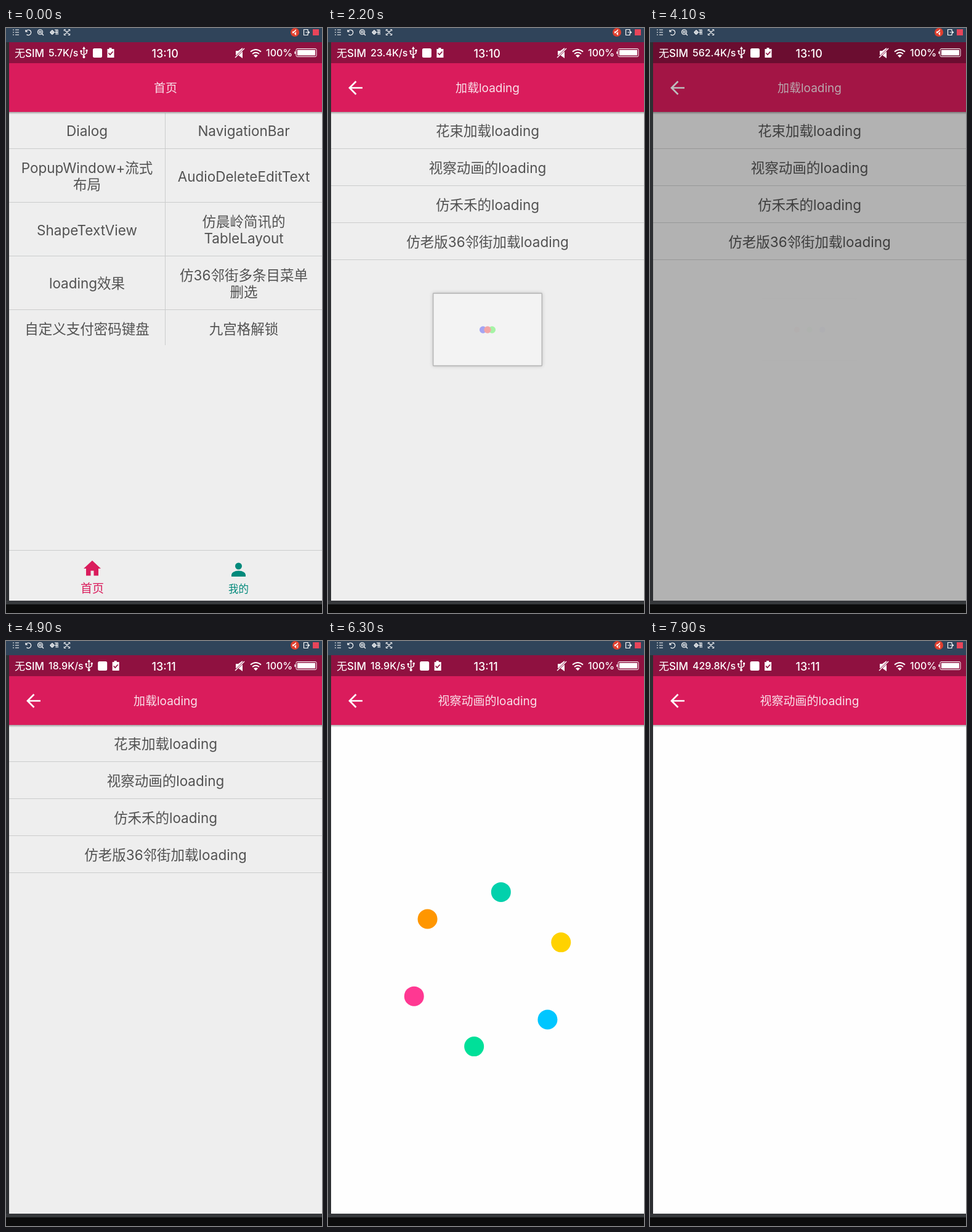
An HTML page that plays this animation: 513x948 px, repeating every 8 s.

```html
<!DOCTYPE html>
<html lang="zh-CN">
<head>
<meta charset="utf-8">
<title>Loading demos</title>
<style>
  html, body { margin: 0; width: 100%; height: 100%; overflow: hidden; background: #0c0c0c; }
  svg { display: block; width: 513px; height: 948px; }
  text { font: 400 22.5px Inter, "Noto Sans CJK SC", "Noto Sans CJK", sans-serif; fill: #525252; text-anchor: middle; }
  .title { font-size: 19px; fill: #f9e2ea; }
  #status text { font-size: 16px; font-weight: 500; fill: #fff; text-anchor: start; }
  .line { fill: none; stroke: #fff; }
  .rule { stroke: #cbcccc; }
  #panel { filter: drop-shadow(0 0 4px rgba(0,0,0,.6)); }
</style>
</head>
<body>
<svg viewBox="0 0 513 948">
  <defs>
    <clipPath id="screen"><path d="M5 23H513V928H5z"/></clipPath>
    <linearGradient id="shade" x2="0" y2="1">
      <stop stop-opacity=".32"/><stop offset="1" stop-opacity="0"/>
    </linearGradient>
    <path id="back" class="line" stroke-width="2.7" d="M56 97H36M45.500 86.500L35 97L45.500 107.500"/>
  </defs>

  <path fill="#2d2f32" d="M0 22H5V934H0z"/>
  <path fill="#36383b" d="M0 928H513V934H0z"/>
  <path fill="#30445a" d="M0 0H513V23H0z"/>
  <g class="line" stroke-width="1.2">
    <path d="M11 3h2M15 3h6M11 7h2M15 7h6M11 11h2M15 11h6"/>
    <path d="M32 3v3h3M32.500 5.500a4.300 4.300 0 1 1 1 5"/>
    <circle cx="55.500" cy="6.500" r="4"/><path d="M58 9l3 3M54 5h3v3h-3z"/>
    <circle cx="75" cy="7" r="2.500"/><path d="M71 7h8M75 3v8M79 3h5v8M79 7h5M81.500 3v8"/>
    <path d="M94.500 5V2.500H97M101 2.500h2.500V5M103.500 9v2.500H101M97 11.500h-2.500V9M96 4l6 6M102 4l-6 6"/>
    <path d="M490 5V2.500h-6.500v9h6.500V9M486.500 7h6M490 5l2.500 2l-2.500 2"/>
  </g>
  <circle cx="469" cy="7" r="7" fill="#e0402f"/>
  <path fill="#fff" d="M465 5.500h2l4-3.500v10l-4-3.500h-2z"/>
  <path stroke="#e0402f" stroke-width="1.500" d="M464 12L474 2"/>
  <path fill="#e8455a" d="M498 2h10v10h-10z"/>

  <g clip-path="url(#screen)">
    <path d="M5 23H513V928H5z"/>
    <g id="home"></g>
    <g id="list"></g>
    <g id="ring"></g>
    <path id="dim" d="M5 23H513V928H5z"/>
    <g id="dialog">
      <rect id="panel" x="-109" y="-73" width="218" height="145" rx="1" fill="#fff" stroke="rgba(0,0,0,.7)" stroke-width="2"/>
      <circle r="7"/><circle r="7"/><circle r="7"/>
    </g>
  </g>

  <g id="status">
    <text x="14" y="46.500" style="font-size:17px">无SIM</text>
    <text id="speed" x="69" y="46"></text>
    <text id="clock" x="236.500" y="47.500" style="font-size:18px"></text>
    <text x="422" y="46">100%</text>
    <g id="icons">
      <path class="line" stroke-width="1.500" d="M9 33v13M4.500 38v3.500l4.500 3M13.500 37v3.500l-4.500 3"/>
      <path fill="#fff" d="M9 30l2.500 4h-5zM3 36h3v3h-3zM12 35h3v3h-3z"/>
      <circle cx="9" cy="47" r="2" fill="#fff"/>
      <rect x="23.500" y="33" width="15" height="15" rx="2.500" fill="#fff"/>
      <path fill="#fff" d="M47 34h3v-2h4v2h4v14h-11z"/>
      <path fill="none" stroke="#8f1140" stroke-width="1.700" d="M49 40.500l2.500 2.800l4.500-5"/>
    </g>
    <path fill="#fff" d="M373 37h4l7-5v17l-7-5h-4z"/>
    <path stroke="#8f1140" stroke-width="3" d="M373 47L387 33"/>
    <path class="line" stroke-width="1.500" d="M372 48L387 33"/>
    <path class="line" stroke-width="1.900" d="M397 38.500q8.500-7 17 0M400 42q5.500-4.500 11 0"/>
    <path fill="#fff" d="M402 44.500q3.500-2.500 7 0l-3.500 3.500z"/>
    <rect class="line" x="471" y="33.500" width="33" height="13" rx="2"/>
    <path fill="#fff" d="M473 35.500h29v9h-29zM468.500 38h1.500v4h-1.500z"/>
  </g>
</svg>

<script>
const LOOP = 8000, TICK = 100, WIDTH = 508;
const $ = id => document.getElementById(id);
const clamp = v => Math.min(1, Math.max(0, v));
const easeOut = p => 1 - (1 - p) ** 2;
const progress = (t, start, length) => clamp((t - start) / length);

const text = (x, y, s, attrs = '', size = 22.5) =>
  `<text x="${x}" y="${y + size * 0.36}" ${attrs}>${s}</text>`;
const rule = d => `<path class="rule" d="${d}"/>`;
const page = (background, title, content, back = '<use href="#back"/>') => `
  <path fill="${background}" d="M5 23H513V928H5z"/>${content}
  <path fill="#8f1140" d="M5 23H513V57H5z"/>
  <path fill="#da1c5c" d="M5 57H513V136H5z"/>
  <path fill="url(#shade)" d="M5 136H513V140H5z"/>
  ${back}${text(259, 97.5, title, 'class="title"', 19)}`;

// Home: two columns of one- or two-line cells
const cells = [
  [167, ['Dialog'], ['NavigationBar']],
  [240.5, ['PopupWindow+流式', '布局'], ['AudioDeleteEditText']],
  [327.5, ['ShapeTextView'], ['仿晨岭简讯的', 'TableLayout']],
  [414, ['loading效果'], ['仿36邻街多条目菜单', '删选']],
  [487.5, ['自定义支付密码键盘'], ['九宫格解锁']],
];
const cell = (x, y, lines) =>
  lines.map((s, i) => text(x, y + (i - (lines.length - 1) / 2) * 27, s)).join('');
$('home').innerHTML = page('#eeeeee', '首页',
  cells.map(([y, left, right]) => cell(131.5, y, left) + cell(386, y, right)).join('') +
  [195.5, 282.5, 369.5, 456.5].map(y => rule(`M5 ${y}H513`)).join('') +
  rule('M258.5 138V514') + rule('M5 846.5H513') + `
  <path fill="#da1c5c" d="M140 863L126 876h4v11.500h7.500v-8h5v8h7.500V876h4z"/>
  <circle cx="377.500" cy="872" r="5.500" fill="#00897b"/>
  <path fill="#00897b" d="M366 889v-3q1-6 11.500-6.500q10.500.5 11.500 6.500v3z"/>` +
  text(140, 908, '首页', 'style="font-size:19px;fill:#da1c5c"', 19) +
  text(377.5, 909, '我的', 'style="font-size:16.5px;fill:#00897b"', 16.5), '');

const items = ['花束加载loading', '视察动画的loading', '仿禾禾的loading', '仿老版36邻街加载loading'];
$('list').innerHTML = page('#eeeeee', '加载loading',
  items.map((s, i) => text(259, 167 + 60 * i, s) + rule(`M5 ${195.5 + 60 * i}H513`)).join(''));

const ringColors = ['#ff9600', '#02d1ac', '#ffd200', '#00c6ff', '#00e099', '#ff3892'];
$('ring').innerHTML = page('#fefefe', '视察动画的loading',
  ringColors.map(c => `<circle r="16" fill="${c}"/>`).join(''));
const ringDots = $('ring').querySelectorAll('circle');
const dialogDots = $('dialog').querySelectorAll('circle');

function slide(from, to, p) {
  const e = easeOut(p);
  $(from).setAttribute('transform', `translate(${0.15 * WIDTH * e})`);
  $(to).setAttribute('transform', `translate(${WIDTH * (1 - e)})`);
}

// Six dots turn, then swing outwards and collapse into the centre
function drawRing(t) {
  const turning = t < 5650 ? 0 : Math.min(t, 7350) - 5567;
  const u = -progress(t, 7350, 480);
  const radius = 127 * (u * u * (6 * u + 5) + 1);
  ringDots.forEach((dot, i) => {
    const a = Math.PI * (i / 3 + turning / 600);
    dot.setAttribute('cx', 259 + radius * Math.cos(a));
    dot.setAttribute('cy', 532 + radius * Math.sin(a));
    dot.style.display = u > -1 ? '' : 'none';
  });
}

// Outer dots part and meet; the three colours rotate at each meeting
function drawDialog(t) {
  const out = progress(t, 3957, 144);
  const shown = t >= 2200 && out < 1;
  const scale = 0.81 + 0.19 * easeOut(progress(t, 2200, 200)) - 0.31 * out;
  $('dim').setAttribute('opacity', 0.6 * progress(t, 2200, 200) * (1 - progress(t, 3957, 250)));
  $('dialog').style.display = shown ? '' : 'none';
  $('dialog').setAttribute('opacity', clamp(0.3 + (t - 2200) / 140) * (1 - out));
  $('dialog').setAttribute('transform', `translate(259 489) scale(${scale})`);
  if (!shown) return;
  const time = t - 2160, round = Math.floor(time / 700), q = time % 700 / 350;
  const spread = 42.3 * (1 - (1 - q) ** 2);
  const colors = ['#00f', '#f00', '#0f0'];
  [0, 2, 1].forEach((place, i) => {
    dialogDots[i].setAttribute('cx', (place - 1) * spread);
    dialogDots[i].setAttribute('fill', colors[(place + 2 * round) % 3]);
  });
}

function drawStatus(t) {
  $('speed').textContent = (t < 1000 ? '5.7' : t < 3100 ? '23.4' : t < 4900 ? '562.4' : t < 7000 ? '18.9' : '429.8') + 'K/s';
  $('clock').textContent = t < 4900 ? '13:10' : '13:11';
  $('icons').setAttribute('transform', `translate(${69 + $('speed').getComputedTextLength()})`);
}

const start = performance.now();
function draw() {
  const t = Math.floor((performance.now() - start) % LOOP / TICK) * TICK;
  slide('home', 'list', progress(t, 620, 280));
  if (t > 5500) slide('list', 'ring', progress(t, 5500, 280));
  else $('ring').setAttribute('transform', `translate(${WIDTH})`);
  drawRing(t);
  drawDialog(t);
  drawStatus(t);
  requestAnimationFrame(draw);
}
draw();
</script>
</body>
</html>
```
